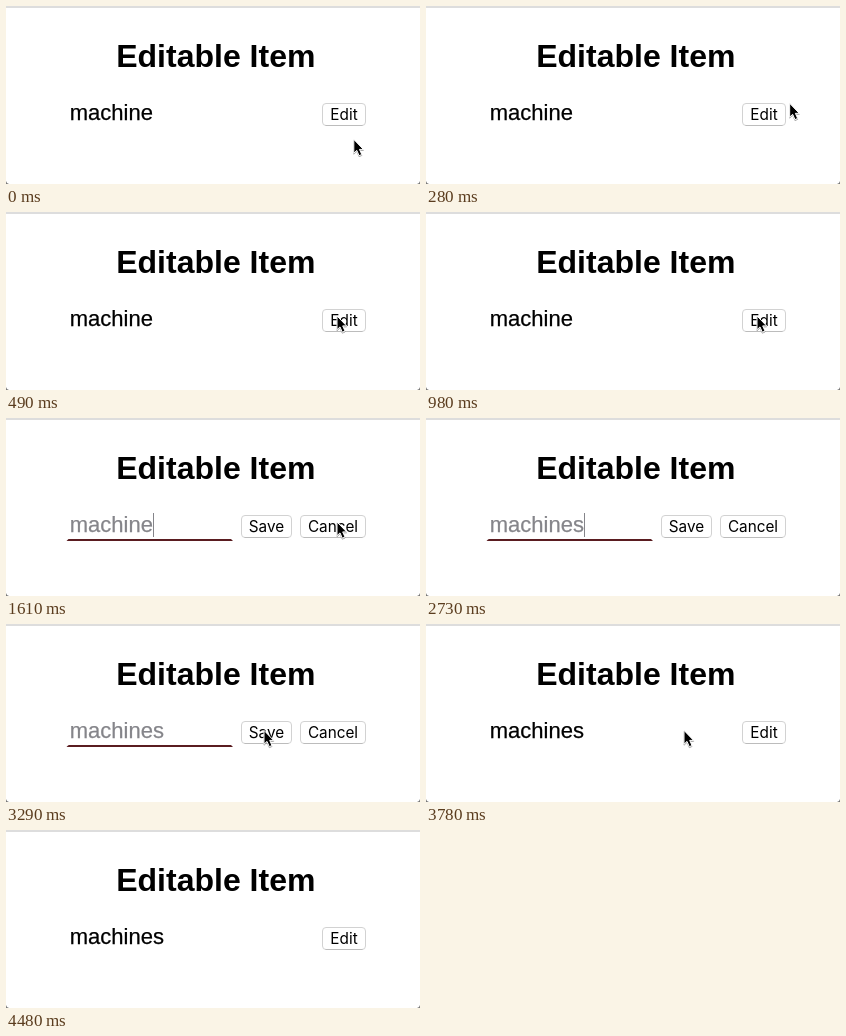
Animation, 414 px wide and 178 px high, one loop 4550 ms. Source, as an HTML page:

```html
<!DOCTYPE html>
<html lang="en">
<head>
<meta charset="utf-8">
<title>Editable Item</title>
<style>
  html, body { margin: 0; width: 100%; height: 100%; overflow: hidden; background: #fff; }
  svg { display: block; width: 100%; height: 100%; }
  text { font-family: "Liberation Sans", Arial, sans-serif; }
  .title { font-size: 32px; font-weight: bold; text-anchor: middle; }
  #word { font-size: 22px; stroke-width: .25px; }
  .button rect { fill: #fff; stroke: #d2d2d2; }
  .button path { stroke: #bcbcbc; }
  .button text { font: 15.3px Inter, Roboto, sans-serif; text-anchor: middle; }
</style>
</head>
<body>
<svg viewBox="0 0 414 178">
  <path d="M0 1H414" stroke="#d2d2d2" stroke-width="1.4"/>
  <path d="M0 175V178H3Q0.5 177.5 0 175M414 175V178H411Q413.5 177.5 414 175" fill="#777"/>
  <text class="title" x="209.8" y="61">Editable Item</text>
  <text id="word" x="63.8" y="114"></text>
  <g id="view"></g>
  <g id="form">
    <path d="M62.5 121H225L227 123H60.5Z" fill="#5a1c20"/>
    <path id="caret" d="M0 95V119" stroke="#85858a"/>
  </g>
  <circle id="ring" cx="331" cy="105" r="22" fill="none" stroke="#333" stroke-width="1.5"/>
  <path id="cursor" d="M.4 .4V14.2L3.4 11.4L5.7 16.7L8.4 15.5L6.1 10.4H10Z"
        stroke="#fff" style="filter: drop-shadow(0 1px .7px #0005)"/>
</svg>
<script>
  const LOOP = 4550, STEP = 70;
  const CLICK = 910, EDIT = 1610, BLINK = 2170, TYPE = 2730, MOVE = 3080, CARET_OFF = 3220;
  const SAVE = 3780, LEAVE = 4270, GONE = 4480;
  const $ = id => document.getElementById(id);
  const show = (id, on) => $(id).setAttribute("visibility", on ? "visible" : "hidden");

  const start = [347.4, 133], bend = [391, 79], edit = [330.6, 103.5];
  const save = [257.6, 106], exit = [215, 180];

  const progress = (t, from, to) => Math.min(1, Math.max(0, (t - from) / (to - from)));
  const mix = (a, b, k) => a.map((v, i) => v + (b[i] - v) * k);

  function pointer(t) {
    if (t < TYPE) {
      const k = progress(t, 0, 490);
      return mix(mix(start, bend, k), mix(bend, edit, k), k);
    }
    if (t < LEAVE) return mix(edit, save, 1 - (1 - progress(t, 3010, 3290)) ** 1.5);
    return mix(save, exit, progress(t, LEAVE, GONE) ** 1.2);
  }

  function addButton(group, label, x, width) {
    $(group).insertAdjacentHTML("beforeend", `<g class="button">
      <rect x="${x + .5}" y="97.5" width="${width - 1}" height="22" rx="3.5"/>
      <path d="M${x + 3.5} 119.5H${x + width - 3.5}"/>
      <text x="${x + width / 2}" y="114">${label}</text></g>`);
  }
  addButton("view", "Edit", 316, 44);
  addButton("form", "Save", 235, 51);
  addButton("form", "Cancel", 294, 66);

  function draw(now) {
    const t = Math.floor(now % LOOP / STEP) * STEP;
    const editing = t >= EDIT && t < SAVE;
    const typed = t >= TYPE;
    const color = editing ? "#85858a" : "#000";
    show("view", !editing);
    show("form", editing);
    show("caret", editing && (t < BLINK || typed && t < CARET_OFF));
    $("caret").setAttribute("transform", `translate(${typed ? 158.5 : 147.5})`);
    $("word").textContent = typed ? "machines" : "machine";
    $("word").setAttribute("fill", color);
    $("word").setAttribute("stroke", color);
    show("ring", t === CLICK);
    show("cursor", t < TYPE || t >= MOVE && t < GONE);
    $("cursor").setAttribute("transform", `translate(${pointer(t)})`);
  }

  const begin = performance.now();
  function tick() {
    draw(performance.now() - begin);
    requestAnimationFrame(tick);
  }
  tick();
</script>
</body>
</html>
```
